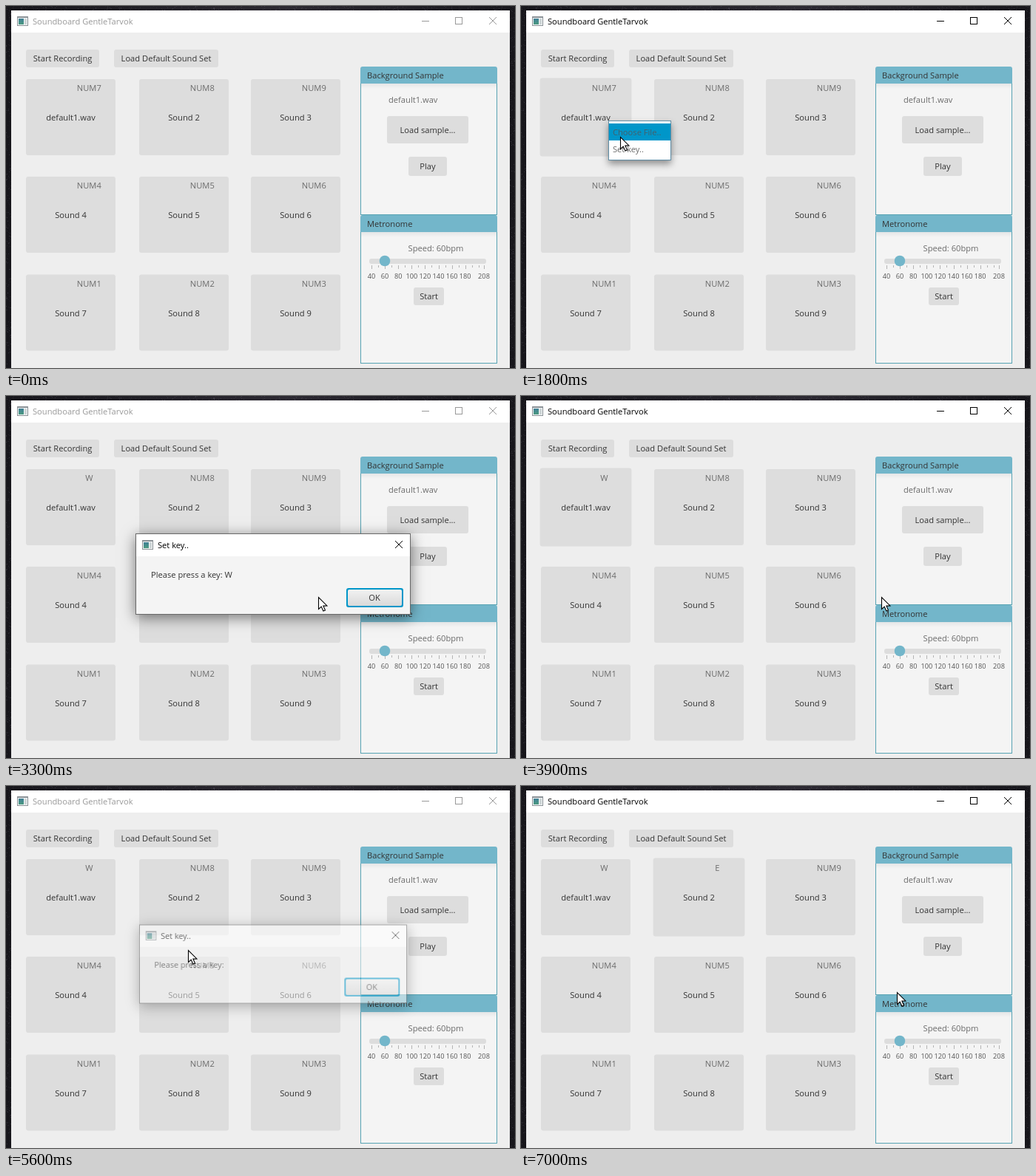
An HTML page with a canvas for the animation above (7100 ms loop, 688 by 490 pixels).

```html
<!DOCTYPE html>
<html lang="en">
<head>
<meta charset="utf-8">
<title>Soundboard</title>
<style>
html, body { margin: 0; width: 100%; height: 100%; overflow: hidden; background: #141418; }
canvas { display: block; }
</style>
</head>
<body>
<canvas id="stage" width="688" height="490"></canvas>
<script>
const W = 688, H = 490, LOOP = 7100, STEP = 100;
const FONT = '"Open Sans", "Noto Sans", sans-serif';
const TEAL = '#73b6ca', EDGE = '#58a3b3', BLUE = '#0096c9';
const BTN = '#dddddd', INK = '#333333', DIM = '#6b6b6b';
const stage = document.getElementById('stage').getContext('2d');

function makeLayer() {
  const c = document.createElement('canvas');
  c.width = W;
  c.height = H;
  return c.getContext('2d');
}

function rect(g, x, y, w, h, fill, r = 0) {
  g.fillStyle = fill;
  g.beginPath();
  g.roundRect(x, y, w, h, r);
  g.fill();
}

function frame(g, x, y, w, h, color) {
  g.strokeStyle = color;
  g.lineWidth = 1;
  g.strokeRect(x + 0.5, y + 0.5, w - 1, h - 1);
}

function line(g, color, ...pts) {
  g.strokeStyle = color;
  g.lineWidth = 1;
  g.beginPath();
  for (let i = 0; i < pts.length; i += 4) {
    g.moveTo(pts[i], pts[i + 1]);
    g.lineTo(pts[i + 2], pts[i + 3]);
  }
  g.stroke();
}

// y is the middle of the capitals
function text(g, str, x, y, color = INK, align = 'left', size = 11.15) {
  g.font = `${size}px ${FONT}`;
  g.textAlign = align;
  g.fillStyle = color;
  g.fillText(str, x, y + size * 0.37);
}

function button(g, label, x, y, w, h) {
  rect(g, x, y, w, h, BTN, 3);
  text(g, label, x + w / 2, y + h / 2, INK, 'center');
}

function vertical(g, y0, y1, c0, c1) {
  const grad = g.createLinearGradient(0, y0, 0, y1);
  grad.addColorStop(0, c0);
  grad.addColorStop(1, c1);
  return grad;
}

function windowIcon(g, x, y) {
  rect(g, x, y, 15, 13, '#8b9297');
  rect(g, x + 1, y + 2, 13, 10, '#f3f6f6');
  rect(g, x + 2, y + 3, 7, 8, vertical(g, y + 3, y + 11, '#3f7f96', '#4c9a80'));
  rect(g, x + 10, y + 3, 3, 8, '#cdd4d6');
}

function cross(g, x, y, color) {
  line(g, color, x, y, x + 10, y + 10, x + 10, y, x, y + 10);
}

function desktop(g) {
  rect(g, 0, 0, W, H, '#17161b');
  const glow = g.createLinearGradient(0, 0, W, 0);
  glow.addColorStop(0, 'rgba(60,58,70,0)');
  glow.addColorStop(0.55, 'rgba(70,64,78,.45)');
  glow.addColorStop(1, 'rgba(60,58,70,0)');
  rect(g, 0, 0, W, 6, glow);
  let seed = 7;
  const rnd = () => (seed = seed * 16807 % 2147483647) / 2147483647;
  for (let i = 0; i < 900; i++) {
    const p = rnd();
    const x = p < 0.42 ? rnd() * W : p < 0.71 ? rnd() * 7 : 681 + rnd() * 7;
    const y = p < 0.42 ? rnd() * 6 : rnd() * H;
    rect(g, x | 0, y | 0, 1, 1, `rgba(150,145,165,${rnd() * 0.22})`);
  }
}

function panel(g, title, y, h) {
  rect(g, 479, y + 4, 185, h - 4, '#f4f4f4');
  rect(g, 480, y + 23, 183, 7, vertical(g, y + 23, y + 30, '#e4e6e7', '#f4f4f4'));
  frame(g, 479, y + 4, 185, h - 4, EDGE);
  rect(g, 479, y, 185, 23, TEAL, [3, 3, 0, 0]);
  text(g, title, 488, y + 12);
}

function metronome(g) {
  panel(g, 'Metronome', 283, 201);
  text(g, 'Speed: 60bpm', 581, 328, DIM, 'center');
  rect(g, 491, 342, 158, 7, BTN, 3);
  const pos = v => 494 + (v - 40) * 0.905;
  for (let v = 40; v <= 200; v += 10) {
    const major = v % 20 === 0 && v < 200;
    const x = Math.round(pos(v)) + 0.5;
    line(g, '#b4b4b4', x, 351, x, major ? 356 : 354);
    if (major) text(g, v, pos(v), 366, '#555', 'center', 9.2);
  }
  line(g, '#b4b4b4', 646.5, 351, 646.5, 356);
  text(g, 208, 646, 366, '#555', 'center', 9.2);
  g.fillStyle = TEAL;
  g.beginPath();
  g.arc(512, 345, 7.3, 0, 7);
  g.fill();
  button(g, 'Start', 551, 381, 41, 24);
}

function paintBase(g) {
  desktop(g);
  rect(g, 7, 6, 674, 30, '#fff');
  rect(g, 7, 36, 674, 454, '#eeeeee');
  windowIcon(g, 15, 14);
  button(g, 'Start Recording', 27, 59, 99, 24);
  button(g, 'Load Default Sound Set', 146, 59, 141, 24);
  panel(g, 'Background Sample', 82, 201);
  text(g, 'default1.wav', 517, 127, DIM);
  button(g, 'Load sample...', 515, 149, 110, 37);
  button(g, 'Play', 544, 204, 52, 26);
  metronome(g);
}

function titleBar(g, active) {
  const c = active ? '#000' : '#999';
  text(g, 'Soundboard GentleTarvok', 36, 21, c);
  line(g, c, 562, 20.5, 572, 20.5);
  frame(g, 607, 15, 10, 10, c);
  cross(g, 653, 15, c);
}

function pads(g, keys, focus) {
  const xs = [27, 180, 331], ys = [99, 231, 363.5];
  for (let i = 0; i < 9; i++) {
    const x = xs[i % 3], y = ys[i / 3 | 0], grow = i === focus ? 1.4 : 0;
    rect(g, x - grow, y - grow, 121 + 2 * grow, 103 + 2 * grow, BTN, 3);
    text(g, keys[i], x + 85.3, y + 12, DIM, 'center');
    text(g, i ? `Sound ${i + 1}` : 'default1.wav', x + 60.5, y + 52, INK, 'center');
  }
}

function menu(g, x, y, row) {
  g.save();
  g.shadowColor = 'rgba(0,0,0,.4)';
  g.shadowBlur = 9;
  g.shadowOffsetY = 5;
  rect(g, x, y, 85, 54, '#fff');
  g.restore();
  if (row >= 0) rect(g, x + 1, y + 4 + row * 23, 83, 23, BLUE);
  text(g, 'Choose File..', x + 6, y + 16, row === 0 ? '#45606c' : DIM);
  text(g, 'Set key..', x + 6, y + 39, row === 1 ? '#45606c' : DIM);
  frame(g, x, y, 85, 54, '#5f8da5');
}

const sheet = makeLayer();
function dialog(g, key, k) {
  const d = sheet;
  d.clearRect(0, 0, W, H);
  d.save();
  d.shadowColor = 'rgba(0,0,0,.5)';
  d.shadowBlur = 18;
  d.shadowOffsetY = 4;
  rect(d, 175, 186, 372, 110, '#f4f4f4');
  d.restore();
  rect(d, 176, 187, 370, 30, '#fff');
  frame(d, 175, 186, 372, 110, '#6a6a6a');
  windowIcon(d, 184, 195);
  text(d, 'Set key..', 205, 202, '#000');
  cross(d, 526, 196, '#000');
  text(d, `Please press a key: ${key}`, 196, 242);
  rect(d, 460, 260, 77, 26, BLUE, 3);
  rect(d, 462, 262, 73, 22, vertical(d, 262, 284, '#f2f2f2', '#d9d9d9'), 2);
  text(d, 'OK', 498, 273, INK, 'center');

  const s = 0.92 + 0.08 * k;
  g.save();
  g.globalAlpha = k ** 1.5;
  g.translate(361, 241);
  g.scale(s, s);
  g.drawImage(d.canvas, -361, -241);
  g.restore();
}

function pointer(g, x, y) {
  g.beginPath();
  [[0, 0], [0, 16], [3.7, 12.6], [6.4, 18.6], [9, 17.5], [6.4, 11.6], [11.4, 11.4]]
    .forEach(([dx, dy]) => g.lineTo(x + 0.5 + dx, y + 0.5 + dy));
  g.closePath();
  g.fillStyle = '#fff';
  g.strokeStyle = '#000';
  g.lineWidth = 1.1;
  g.fill();
  g.stroke();
}

// time, x, y of the pointer tip
const path = [
  [100, 590, 470], [1100, 118, 155], [1400, 118, 155], [1800, 134, 177],
  [2100, 141, 200], [2800, 141, 200], [3300, 422, 272], [3600, 508, 279],
  [3800, 508, 279], [4400, 225, 179], [4800, 225, 179], [4900, 234, 192],
  [5300, 246, 222], [5800, 246, 222], [6100, 422, 272], [6400, 508, 279],
  [7100, 508, 279]
];

function pointerAt(t) {
  const i = path.findIndex(p => p[0] > t);
  const [t0, x0, y0] = path[i - 1], [t1, x1, y1] = path[i];
  const u = (t - t0) / (t1 - t0), e = u * u * (3 - 2 * u);
  return [Math.round(x0 + (x1 - x0) * e), Math.round(y0 + (y1 - y0) * e)];
}

const turns = [
  { pad: 0, key: 'W', press: 1100, menu: 1300, x: 118, y: 155, open: 2200, typed: 2700, close: 3700 },
  { pad: 1, key: 'E', press: 4700, menu: 4900, x: 225, y: 179, open: 5500, typed: 5900, close: 6600 }
];

const base = makeLayer();
paintBase(base);

function draw(t) {
  const g = stage;
  const keys = [7, 8, 9, 4, 5, 6, 1, 2, 3].map(n => `NUM${n}`);
  const now = turns.filter(s => t >= s.press).pop();
  for (const s of turns) if (t >= s.typed) keys[s.pad] = s.key;
  const active = now && (t < now.open || t >= now.close);
  const tip = t >= 100 && pointerAt(t);

  g.drawImage(base.canvas, 0, 0);
  titleBar(g, active);
  pads(g, keys, active ? now.pad : -1);
  if (now) {
    if (t >= now.menu && t < now.open) {
      const row = Math.floor((tip[1] - now.y - 4) / 23);
      menu(g, now.x, now.y, Math.min(row, 1));
    }
    const k = t < now.close ? Math.min(1, (t - now.open + 100) / 300) : 0.45;
    if (t >= now.open && t < now.close + STEP) dialog(g, t >= now.typed ? now.key : '', k);
  }
  if (tip) pointer(g, ...tip);
}

const start = performance.now();
function tick() {
  const t = (performance.now() - start) % LOOP;
  draw(Math.floor(t / STEP) * STEP);
  requestAnimationFrame(tick);
}
tick();
</script>
</body>
</html>
```
